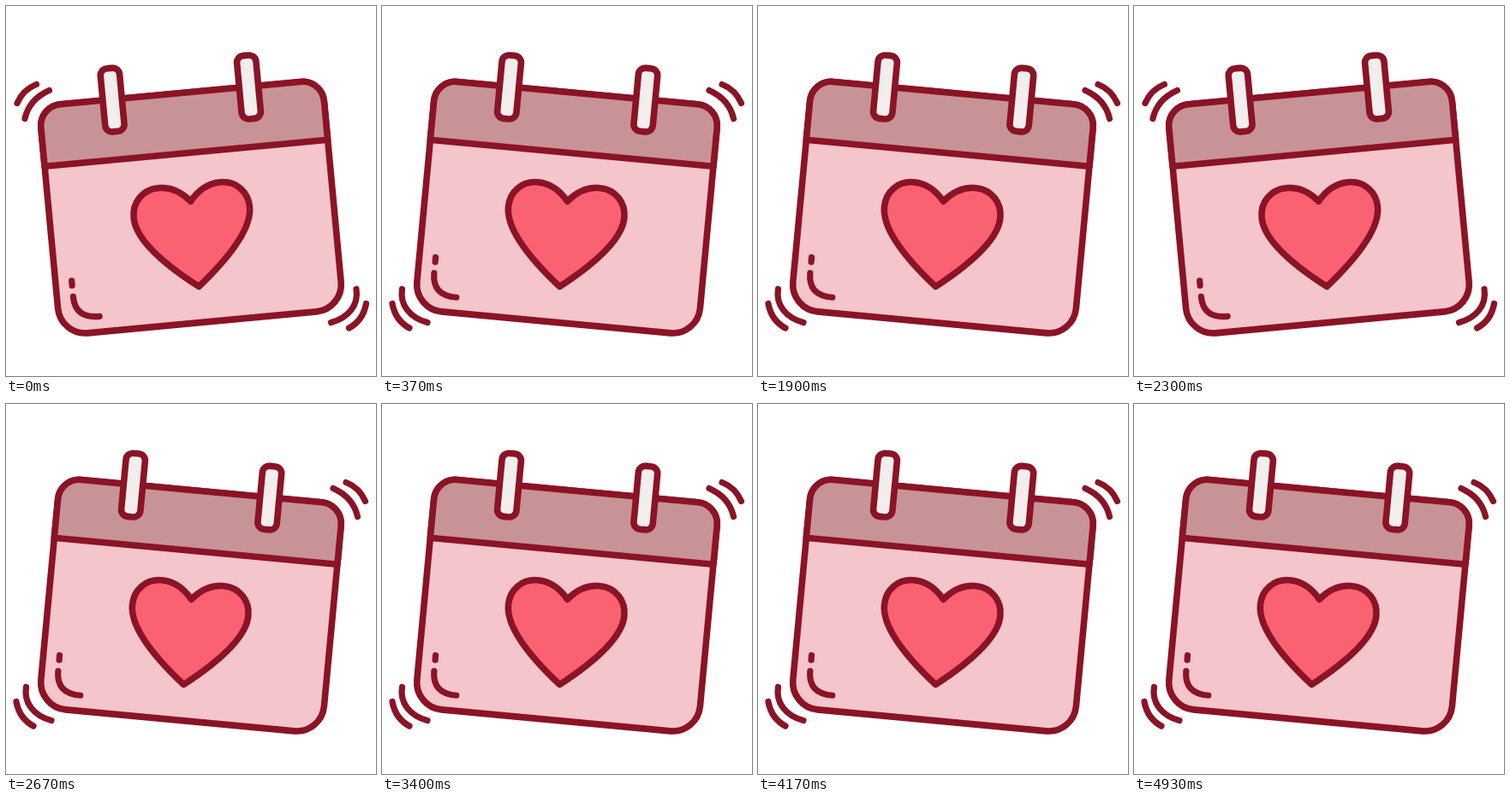
Animation of 432 by 432 pixels, one loop 5.31 s. Source, as an HTML page:

```html
<!DOCTYPE html>
<html lang="en">
<head>
<meta charset="utf-8">
<title>Wobbling calendar</title>
<style>
  html, body { margin: 0; width: 100%; height: 100%; overflow: hidden; background: #fff; }
  svg { display: block; width: 100%; height: 100%; }
  .line { fill: none; stroke: #8b1326; stroke-width: 7.6; stroke-linecap: round; stroke-linejoin: round; }
  .thin { stroke-width: 7.2; }
</style>
</head>
<body>
<svg viewBox="0 0 432 432">
  <g id="shakes" class="line thin">
    <path d="M13 113.500Q20 97.500 35.500 91.500"/>
    <path d="M22 131.500Q27 109 50.500 98.500"/>
    <path d="M409 330.500C412 349 400 364 379.500 369.500"/>
    <path d="M420.500 347.500Q417 367 400.500 376"/>
  </g>
  <g id="calendar" class="line">
    <path fill="#f4c5cb"
      d="M-141-131H141A25 25 0 0 1 166-106V106A32 32 0 0 1 134 138H-134A32 32 0 0 1-166 106V-106A25 25 0 0 1-141-131Z"/>
    <path fill="#c89396" d="M-166-60.500V-106A25 25 0 0 1-141-131H141A25 25 0 0 1 166-106V-60.500Z"/>
    <g fill="#f1eeec">
      <rect x="-91.200" y="-167.500" width="22.400" height="74.200" rx="8"/>
      <rect x="68.800" y="-167.500" width="22.400" height="74.200" rx="8"/>
    </g>
    <path fill="#fa6171"
      d="M0-4C-10-16-22-23-36-23C-55-23-68-9-68 9C-68 37-33 70 .3 96C33 70 68 37 68 9C68-9 55-23 36-23C22-23 10-16 0-4Z"/>
    <g class="thin">
      <path d="M-147 75.500V81"/>
      <path d="M-147 94C-147 111-138 120-118.500 119.800"/>
    </g>
  </g>
</svg>
<script>
  const LOOP = 5310;
  const TILT = 5.35;
  const FLIPS = [370, 770, 1130, 1530, 1900, 2300, 2670, 3070, 3400, 3800, 4170, 4570, 4930];
  const calendar = document.getElementById('calendar');
  const shakes = document.getElementById('shakes');

  function render(time) {
    const flips = FLIPS.filter(flip => flip <= time).length;
    const right = flips % 2 === 1;
    calendar.setAttribute('transform', `translate(216 232) rotate(${right ? TILT : -TILT})`);
    shakes.setAttribute('transform', right ? 'translate(432.5 0) scale(-1 1)' : '');
  }

  const start = performance.now();
  function tick() {
    render((performance.now() - start) % LOOP);
    requestAnimationFrame(tick);
  }
  render(0);
  requestAnimationFrame(tick);
</script>
</body>
</html>
```
